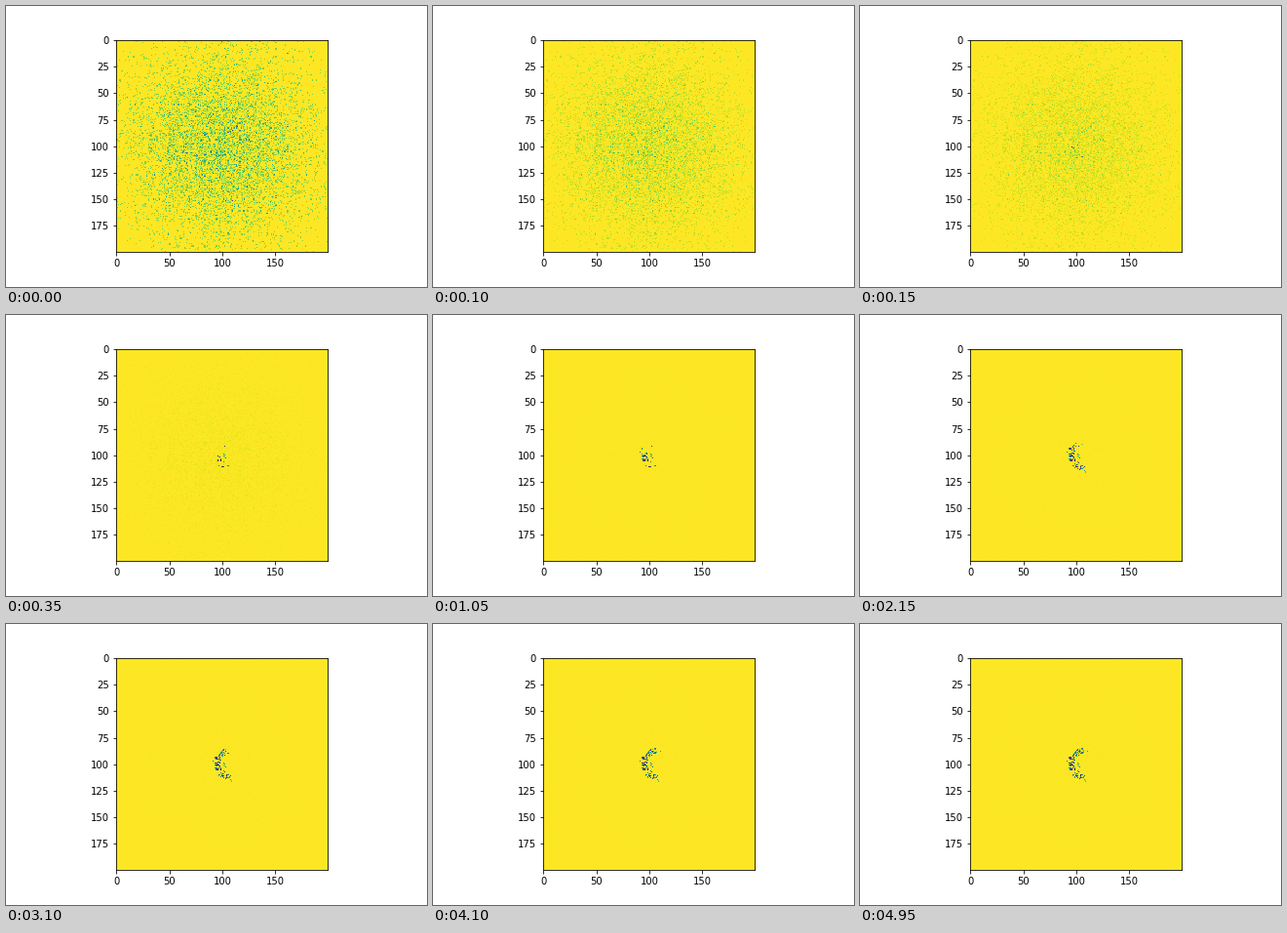
A matplotlib script for the animation above (5 s loop, 432 by 288 pixels).

```python
import matplotlib.pyplot as plt
import numpy as np
from matplotlib.animation import FuncAnimation

SIZE = 200
FRAMES = 100
STEP_MS = 50
rng = np.random.default_rng(7)


def scatter_counts(n=7800, spread=48):
    """Cell counts of a round Gaussian cloud."""
    edges = np.arange(SIZE + 1)
    x, y = rng.normal(SIZE / 2, spread, (2, n))
    return np.histogram2d(y, x, bins=(edges, edges))[0]


def core_cells(n=22):
    """Loose early group near the middle: x, y, depth, birth."""
    x = 100 + rng.normal(0, 4, n).clip(-10, 10)
    y = 101 + rng.normal(0, 6, n).clip(-12, 10)
    return x, y, rng.uniform(0.3, 1, n), rng.uniform(0, 4, n)


def arc_cells(n=115):
    """Arc open to the right, growing from its left side to both ends."""
    angle = rng.uniform(-1.95, 1.95, n)
    x = 104 - 9 * np.cos(angle) + rng.normal(0, 1.5, n)
    y = 100.5 + 12.5 * np.sin(angle) + rng.normal(0, 1.5, n)
    pace = np.where(angle > 0, 15, 32)
    birth = 7 + pace * np.abs(angle) + rng.exponential(9, n)
    return x, y, rng.uniform(0.2, 0.95, n), birth


cloud = scatter_counts()
x, y, depth, birth = np.hstack([core_cells(), arc_cells()])
cols, rows = x.round().astype(int), y.round().astype(int)


def field(i):
    peak = 5 * 1.42 ** min(i, 11)
    grid = np.clip(cloud / peak, 0, 1)
    level = depth * np.clip((i - birth) / 2, 0, 1)
    np.maximum.at(grid, (rows, cols), level)
    return grid


fig = plt.figure(figsize=(6, 4), dpi=72, facecolor="white")
fig.subplots_adjust(left=0.125, right=0.9, bottom=0.125, top=0.88)
ax = fig.add_subplot()
image = ax.imshow(field(0), cmap="viridis_r", vmin=0, vmax=1,
                  interpolation="nearest")
ax.set_xticks(range(0, SIZE, 50))
ax.set_yticks(range(0, SIZE, 25))


def update(i):
    image.set_data(field(i))
    return [image]


anim = FuncAnimation(fig, update, frames=FRAMES, interval=STEP_MS,
                     repeat=True, repeat_delay=0)
plt.show()
```
